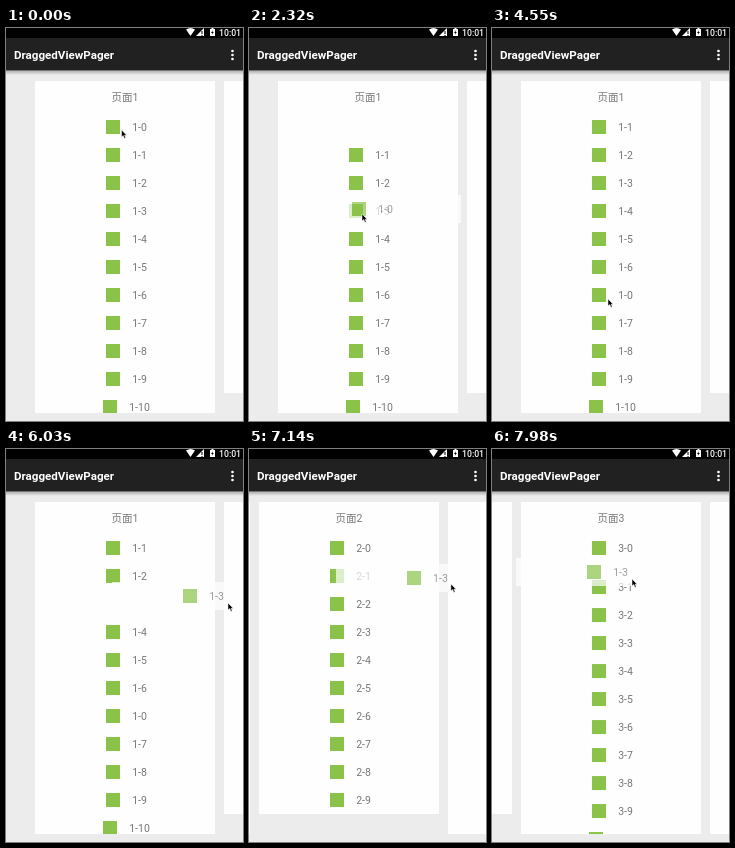
Write an HTML page that moves like this. It is 237 px wide and 393 px high and loops after 8 s.

```html
<!DOCTYPE html>
<html lang="zh">
<head>
<meta charset="utf-8">
<title>DraggedViewPager</title>
<style>
  html, body { margin: 0; width: 100%; height: 100%; overflow: hidden; background: #ececec; }
  body { position: relative; font: 10.5px Roboto, 'Noto Sans CJK SC', 'Noto Sans CJK', sans-serif; color: #777; }
  #stage { position: absolute; left: 0; top: 0; width: 237px; height: 393px; overflow: hidden; background: #ececec; }
  .page, .row, .heading, #cursor, #bars { position: absolute; left: 0; top: 0; }
  .page { top: 53px; width: 180px; height: 332px; overflow: hidden; background: #fefefe; }
  .heading { top: 3px; width: 180px; line-height: 28px; text-align: center; }
  .row { display: flex; align-items: center; justify-content: center; box-sizing: border-box;
         width: 180px; height: 28px; padding-left: 2px; line-height: 28px; white-space: nowrap; }
  .row i { width: 14px; height: 14px; margin: 0 12px 0 1px; background: #8bc34a; }
  .row span { position: relative; top: 1px; }
  #drag { background: #fff; opacity: .7; }
</style>
</head>
<body>
<div id="stage">
  <svg id="bars" width="237" height="48">
    <defs>
      <linearGradient id="shade" x2="0" y2="1">
        <stop stop-color="#000" stop-opacity=".28"/>
        <stop offset="1" stop-color="#000" stop-opacity="0"/>
      </linearGradient>
    </defs>
    <rect y="42.500" width="237" height="4.500" fill="url(#shade)"/>
    <rect width="237" height="42.500" fill="#212121"/>
    <rect width="237" height="10" fill="#000"/>
    <g fill="#fff" font-family="Roboto, sans-serif" font-weight="700">
      <path d="M180 1.500Q184.500 -1.500 189 1.500L184.500 8Z"/>
      <path d="M198 0V8H190Z"/>
      <path d="M196 3V6M196 7V8" stroke="#000"/>
      <path d="M204 1h1.500v-1h2v1h1.500v7h-5Z"/>
      <path d="M207 2l-2 3h1.300l-.5 2 2-3h-1.300Z" fill="#000"/>
      <text x="213" y="7.800" font-size="8.700" font-weight="500">10:01</text>
      <text x="8" y="31" font-size="11.600">DraggedViewPager</text>
      <circle cx="226.500" cy="23" r="1.350"/>
      <circle cx="226.500" cy="27" r="1.350"/>
      <circle cx="226.500" cy="31" r="1.350"/>
    </g>
  </svg>
  <div id="pages"></div>
  <div id="drag" class="row"><i></i><span></span></div>
  <svg id="cursor" width="9" height="12" overflow="visible">
    <path d="M0 0V7L1.700 5.600 3 8.400 4.200 7.800 3 5.200H5.200Z" fill="#000" stroke="#fff" stroke-width=".5"/>
  </svg>
</div>
<script>
const LOOP = 8000, ROW = 28, PITCH = 189, LAG = 60;
const FIRST = { from: 1290, to: 4550, label: '1-0', dx: -81, dy: -19 };
const SECOND = { from: 5620, to: LOOP, label: '1-3', dx: -116, dy: -21 };

// Pointer path: time, x, y
const path = [
  [0, 115.5, 102], [119, 115.5, 102], [120, 113, 101], [1560, 113, 101],
  [2040, 113, 209], [2260, 113, 186], [3010, 113, 186], [3200, 113.6, 233],
  [3260, 114, 248], [3440, 116, 271], [4560, 116, 271], [4960, 148, 160],
  [5600, 148, 160], [5970, 222, 154], [6300, 222, 154], [6970, 203, 136],
  [7080, 203, 136], [7140, 202, 135], [7630, 140, 130], [LOOP, 140, 130]
];

const $ = id => document.getElementById(id);
const clamp = v => Math.min(1, Math.max(0, v));
const place = (el, x, y) => { el.style.transform = `translate(${x}px, ${y}px)`; };
const show = (el, on) => { el.style.visibility = on ? 'visible' : 'hidden'; };

function add(parent, className, html) {
  const el = document.createElement('div');
  el.className = className;
  el.innerHTML = html;
  return parent.appendChild(el);
}

const pages = [11, 10, 12, 11].map((count, p) => {
  const el = add($('pages'), 'page', `<div class="heading">页面${p + 1}</div>`);
  el.style.height = Math.min(332, 32 + count * ROW) + 'px';
  const rows = Array.from({ length: count }, (_, i) =>
    add(el, 'row', `<i></i><span>${p + 1}-${i}</span>`));
  return { el, rows };
});

function pointer(t) {
  const i = Math.max(1, path.findIndex(point => point[0] >= t));
  const [t0, x0, y0] = path[i - 1], [t1, x1, y1] = path[i];
  const k = clamp((t - t0) / (t1 - t0));
  return [x0 + (x1 - x0) * k, y0 + (y1 - y0) * k];
}

// Viscous fluid curve used for page scrolling
function viscous(k) {
  const x = k * 8;
  return x < 1 ? x - 1 + Math.exp(-x) : 0.3679 + 0.6321 * (1 - Math.exp(1 - x));
}
const scrollFrom = (t, start) => PITCH * viscous(clamp((t - start) / 600));
const shiftFrom = (t, start) => ROW * (1 - (1 - clamp((t - start) / 320)) ** 2);

function rowOffset(page, row, t) {
  if (page === 0) {
    if (row === 0) return t < FIRST.to ? 0 : 6 * ROW;
    if (row <= 3) return -shiftFrom(t, 2840);
    if (row <= 6) return -shiftFrom(t, 4070);
  }
  return page === 2 && row > 0 ? shiftFrom(t, 7910) : 0;
}

function draw(t) {
  const scroll = scrollFrom(t, 6245) + scrollFrom(t, 7105);
  pages.forEach(({ el, rows }, p) => {
    place(el, Math.round(29 + p * PITCH - scroll), 0);
    rows.forEach((row, i) => place(row, 0, 32 + i * ROW + rowOffset(p, i, t)));
  });

  const held = [FIRST, SECOND].find(d => t >= d.from && t < d.to);
  show(pages[0].rows[0], held !== FIRST);
  show(pages[0].rows[3], held !== SECOND);
  show($('drag'), held);
  if (held) {
    const [x, y] = pointer(t - LAG);
    $('drag').lastChild.textContent = held.label;
    place($('drag'), x + held.dx, y + held.dy);
  }
  place($('cursor'), ...pointer(t));
}

const start = performance.now();
function tick() {
  draw((performance.now() - start) % LOOP);
  requestAnimationFrame(tick);
}
tick();
</script>
</body>
</html>
```
